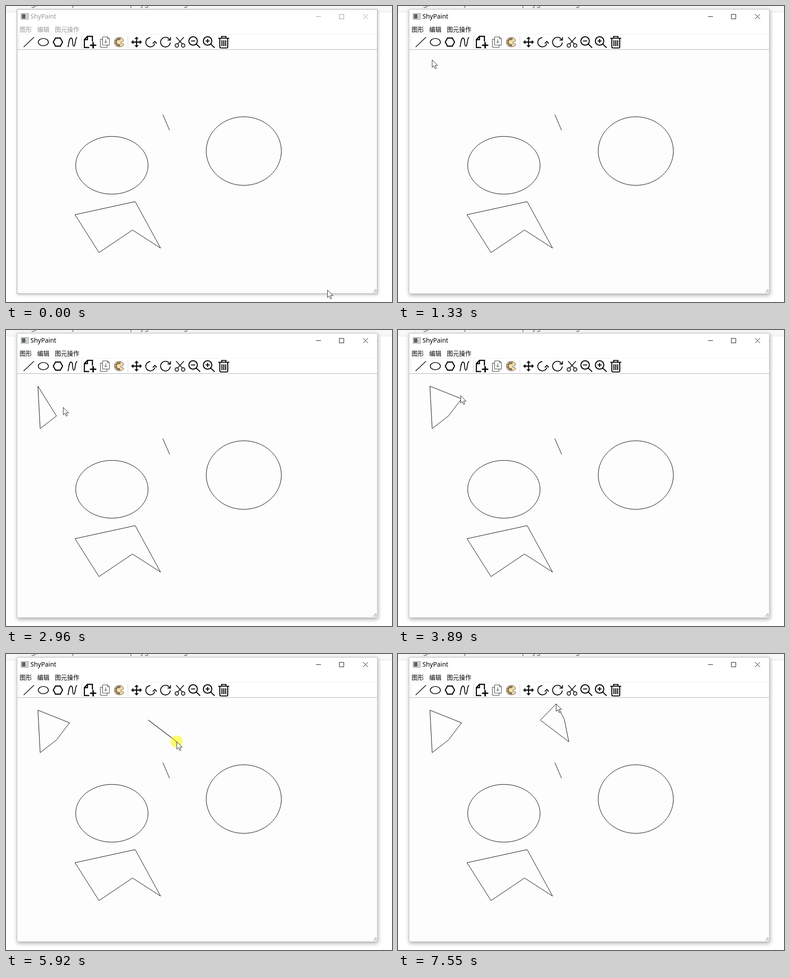
An HTML page for the animation above (8000 ms loop, 853 px wide and 656 px high).

```html
<!DOCTYPE html>
<html lang="zh">
<head>
<meta charset="utf-8">
<style>
  html, body { margin: 0; width: 100%; height: 100%; overflow: hidden; background: #fff; }
  svg { display: block; width: 853px; height: 656px; }
  text { font-family: "Noto Sans", "Noto Sans CJK SC", sans-serif; }
  .menu { font: 13.5px "Noto Sans CJK SC", sans-serif; }
  #frame { fill: #fff; stroke: #c4c4c4; filter: drop-shadow(1px 3px 5px rgba(0,0,0,.35)); }
  .idle #frame { stroke: #a6a6a6; filter: drop-shadow(1px 2px 3px rgba(0,0,0,.25)); }
  #caption { fill: #000; }
  #controls { stroke: #111; fill: none; }
  .idle #caption { fill: #999; }
  .idle #controls { stroke: #999; }
  #hover { fill: #e5f3ff; stroke: #cce8ff; }
  .held #hover { fill: #cce8ff; stroke: #99d1ff; }
  #press { fill: #fffa00; fill-opacity: .55; visibility: hidden; }
  .held #press { visibility: visible; }
  .shapes { fill: none; stroke: #000; }
</style>
</head>
<body>
<svg id="stage" class="idle" viewBox="0 0 853 656">
  <rect width="853" height="13" fill="#f7f8f8"/>
  <path d="M0 13.5H853" stroke="#e4e6e6"/>
  <g font-size="16" fill="#555">
    <text x="36" y="0">img, docs/samp/src/run</text>
    <text x="268" y="0">/polygon-drawing</text>
  </g>

  <rect id="frame" x="24.5" y="7.5" width="796" height="630"/>
  <rect x="25" y="97" width="795" height="540" fill="#fdfdfd"/>
  <path d="M25 62.5H820" stroke="#f0f0f0"/>
  <path d="M25 96.5H820" stroke="#b0b0b0"/>
  <rect x="33.5" y="16.5" width="16" height="13" fill="#f4f4f4" stroke="#8a8a8a"/>
  <rect x="35" y="18" width="8" height="10" fill="#59636b"/>
  <rect x="44" y="18" width="4" height="10" fill="#c9c9c9"/>
  <g id="caption">
    <text x="54" y="28" font-size="14">ShyPaint</text>
    <text class="menu" x="30" y="57">图形</text>
    <text class="menu" x="69" y="57">编辑</text>
    <text class="menu" x="108" y="57">图元操作</text>
  </g>
  <g id="controls">
    <path d="M685 23.5H696M736.5 18.5H746.5V28.5H736.5Z"/>
    <path d="M789 18L800 29M800 18L789 29"/>
  </g>
  <path d="M28.5 66V95" stroke="#a8a8a8" stroke-dasharray="1 2"/>
  <path d="M166.5 66V94M269.5 66V94" stroke="#d4d4d4"/>
  <rect id="hover" x="99.5" y="63.5" width="31" height="31"/>

  <g fill="none" stroke="#000" stroke-width="1.5">
    <path d="M39 91L62 69"/>
    <ellipse cx="82.5" cy="80" rx="11.2" ry="8" stroke-width="1.7"/>
    <path d="M104.5 80L109.5 71H120L125 80L120 89H109.5Z" stroke-width="2.3"/>
    <path d="M137 91C139 83 139 71 144 71C149 71 146 89 149.5 89C154 89 152 72 157 69" stroke-width="1.8"/>
    <g stroke-width="2.4">
      <path d="M184 92H173.2V74.5L180 67.2H191V79M180 67V74.5H173"/>
      <path d="M185.5 87H199.5M192.5 80V94" stroke-width="3"/>
    </g>
    <g stroke="#333" stroke-width="1">
      <path d="M213.5 68.5H224.5L228.5 72.5V86.5H213.5ZM224.5 68.5V72.5H228.5"/>
      <path d="M213 73.5H208.5V91.5H223.5V87"/>
      <path d="M220.5 74V82M217.5 79L220.5 82L223.5 79"/>
    </g>
    <g stroke="#4b4339" stroke-width="1">
      <path d="M250 69.5C257 69 261 75 259 78C257 80 253 79 253.5 82C254 84 259 82 260 85C260 88 255 90.5 250 90.5C236 90 236 70 250 69.5Z" fill="#f8dda8"/>
      <g id="paints" fill="#a58a62"></g>
    </g>
    <path d="M279 80H298M288.5 70V90" stroke-width="2.3"/>
    <path id="tip" d="M276.5 80l5-4.5v9z" fill="#000" stroke="none"/>
    <use href="#tip" transform="rotate(90 288.5 80)"/>
    <use href="#tip" transform="rotate(180 288.5 80)"/>
    <use href="#tip" transform="rotate(270 288.5 80)"/>
    <g stroke-width="1.9">
      <path d="M319 70A10.3 10.3 0 1 0 329 83M324.5 83L329 78.5L333 83"/>
      <path d="M361.5 74.5A10.7 10.7 0 1 0 363 81M363.5 69V75.5H357"/>
    </g>
    <g stroke-width="1.7">
      <circle cx="377.5" cy="87.5" r="3.8"/><circle cx="391.5" cy="87.5" r="3.8"/>
      <path d="M379.5 84L393 69M389.5 84L376 69"/>
    </g>
    <g stroke-width="2.2">
      <g id="lens"><circle cx="413.5" cy="77.5" r="9.4"/><path d="M409 77.5H418M420.5 84.5L429 92.5"/></g>
      <use href="#lens" x="32"/><path d="M445.5 73V82"/>
      <path d="M469 71.5H493.5M476.5 71V67.5H486V71M472.5 72V90Q472.5 93 475 93H487.5Q490 93 490 90V72M477.2 76V89M481.3 76V89M485.4 76V89"/>
    </g>
  </g>
  <path d="M817 628v2M814 631h2M817 631h2M811 634h2M814 634h2M817 634h2" stroke="#aaa" stroke-width="2"/>

  <g class="shapes" transform="translate(.5 .5)">
    <path d="M346 240L361 275"/>
    <ellipse cx="233.5" cy="352.5" rx="80" ry="64"/>
    <ellipse cx="525" cy="321" rx="83" ry="76"/>
    <path d="M152 462L285 433L341 536L279 496L205 546Z"/>
    <polygon id="first"/>
    <polygon id="second"/>
  </g>
  <circle id="press" r="13.5"/>
  <path id="cursor" d="M.5 .5V17L4.3 13.5L7 20L9.7 18.8L7 12.7H12.5Z" fill="#fff" stroke="#222"/>
</svg>
<script>
const LOOP = 8000, TICK = 77.8;
const $ = id => document.getElementById(id);

const home = { x: 710, y: 629 };
const button = { x: 115, y: 80 };

// Each move runs between two ticks and ends in a click, unless it only passes a point.
const move = (leave, arrive, { x, y }, action) => ({ leave, arrive, x, y, action });
const at = (x, y) => ({ x, y });
const moves = [
  move(0, 9, button, 'tool'),
  move(12, 18, at(70, 124), 'first'),
  move(20, 24, at(75, 218), 'first'),
  move(27, 30, at(111, 190), 'first'),
  move(34, 42, at(140, 152), 'first'),
  move(49, 56, button, 'tool'),
  move(59, 63, at(265, 149)),
  move(63, 70, at(314, 146), 'second'),
  move(72, 74, at(377, 194), 'second'),
  move(77, 81, at(367, 144), 'second'),
  move(88, 94, at(349, 110), 'second')
];

$('paints').innerHTML = Array.from({ length: 6 }, (_, i) => {
  const angle = (80 + i * 42) * Math.PI / 180;
  return `<circle cx="${249 + 6 * Math.cos(angle)}" cy="${80 + 7 * Math.sin(angle)}" r="1.8"/>`;
}).join('');

const ease = k => (k + k * k * (3 - 2 * k)) / 2;

function pointerAt(tick) {
  let { x, y } = home;
  for (const m of moves) {
    const k = ease(Math.min(1, Math.max(0, (tick - m.leave) / (m.arrive - m.leave))));
    x += (m.x - x) * k;
    y += (m.y - y) * k;
  }
  return at(Math.round(x), Math.round(y));
}

function render(time) {
  const tick = Math.floor((time + 8) / TICK);
  const { x, y } = pointerAt(tick);
  const clicks = moves.filter(m => m.action && tick > m.arrive);
  const held = clicks.some(m => tick <= m.arrive + 2);
  const over = Math.abs(x - button.x) < 16 && Math.abs(y - button.y) < 16;

  $('stage').classList.toggle('idle', !clicks.length);
  $('stage').classList.toggle('held', held);
  $('hover').setAttribute('visibility', over ? 'visible' : 'hidden');
  for (const id of ['cursor', 'press']) $(id).setAttribute('transform', `translate(${x} ${y})`);
  for (const id of ['first', 'second']) {
    const corners = clicks.filter(m => m.action === id && tick >= m.arrive + 2);
    $(id).setAttribute('points', corners.map(m => `${m.x},${m.y}`).join(' '));
  }
}

const start = performance.now();
function loop() {
  render((performance.now() - start) % LOOP);
  requestAnimationFrame(loop);
}
loop();
</script>
</body>
</html>
```
